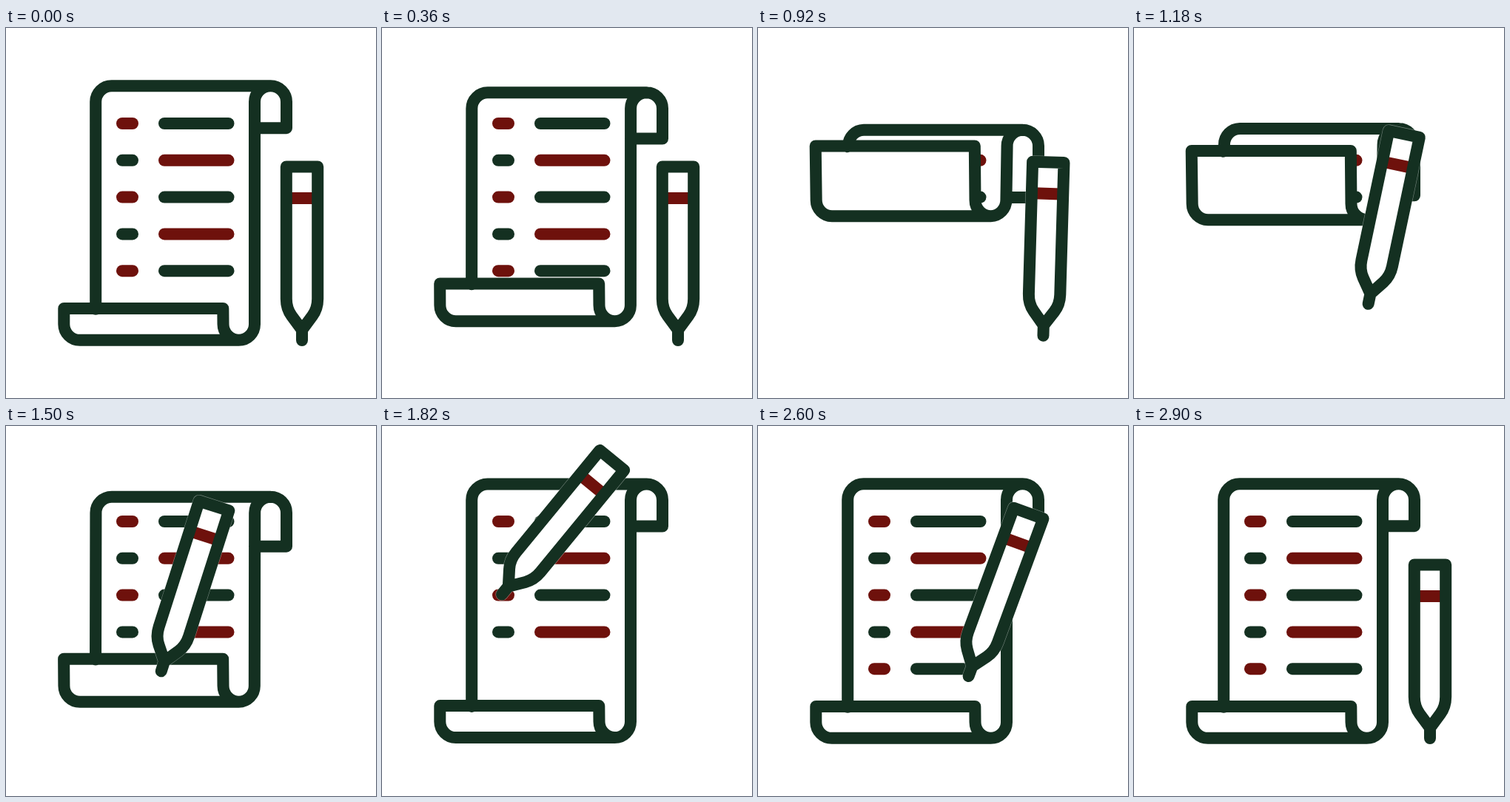
An HTML page that plays this animation: 500x500 px, repeating every 3 s.

```html
<!DOCTYPE html>
<html lang="en">
<head>
<meta charset="utf-8">
<title>Scroll and pencil</title>
<style>
  html, body { margin: 0; width: 100%; height: 100%; overflow: hidden; background: #fff; }
  svg { display: block; width: 100vw; height: 100vh; }
  .line { fill: none; stroke: #143021; stroke-width: 16; stroke-linecap: round; stroke-linejoin: round; }
  .red { stroke: #6e110c; }
  .paper { fill: #fff; }
  .halo { fill: #fff; stroke: #fff; stroke-opacity: .4; stroke-width: 17.2; stroke-linecap: round; stroke-linejoin: round; }
</style>
</head>
<body>
<svg viewBox="0 0 500 500">
  <defs>
    <clipPath id="page"><rect id="window" x="100" width="260"/></clipPath>
    <path id="body" d="M0 0V-14M0-14L-14-33Q-21.2-42.8-21.2-56V-234.5H21.2V-56Q21.2-42.8 14-33Z"/>
  </defs>
  <g id="rows" clip-path="url(#page)"></g>
  <path id="roll" class="paper"/>
  <path id="sheet" class="line"/>
  <g id="pencil">
    <use href="#body" class="halo"/>
    <path class="line red" d="M-18-192H18"/>
    <use href="#body" class="line"/>
  </g>
</svg>
<script>
const LOOP = 3000;
const $ = id => document.getElementById(id);
const mix = (a, b, p) => a + (b - a) * p;
const clamp = v => Math.min(1, Math.max(0, v));

// Symmetric ease: cubic-bezier(a, 0, 1 - a, 1)
function ease(x, a = 0.74) {
  let lo = 0, hi = 1;
  for (let i = 0; i < 24; i++) {
    const s = (lo + hi) / 2, r = 1 - s;
    if (3 * r * r * s * a + 3 * r * s * s * (1 - a) + s * s * s < x) lo = s; else hi = s;
  }
  return lo * lo * (3 - 2 * lo);
}

// Pencil keys: time, tip x, tip y, angle
const keys = [
  [660, 400, 422, 0],
  [1080, 366, 407, 4],
  [1180, 317, 373, 11.9],
  [1500, 210, 331.5, 17.7],
  [1620, 184, 304, 24],
  [1820, 162, 227.5, 39.4],
  [1980, 157, 323, 34],
  [2110, 170, 323, 32.5],
  [2160, 173, 306, 31],
  [2225, 213, 322, 29.5],
  [2260, 222, 323, 29],
  [2560, 271, 324, 22],
  [2700, 329, 399, 14],
  [2900, 400, 422, 0]
];

const slope = (i, c) => (keys[i + 1][c] - keys[i][c]) / (keys[i + 1][0] - keys[i][0]);

function tangent(i, c) {
  if (i === 0 || i === keys.length - 1) return 0;
  const a = slope(i - 1, c), b = slope(i, c);
  return a * b <= 0 ? 0 : 2 * a * b / (a + b);
}

// Smooth interpolation through the keys without overshoot
function pose(t, c) {
  const last = keys.length - 1;
  if (t <= keys[0][0]) return keys[0][c];
  if (t >= keys[last][0]) return keys[last][c];
  let i = 0;
  while (t > keys[i + 1][0]) i++;
  const h = keys[i + 1][0] - keys[i][0];
  const s = (t - keys[i][0]) / h, r = 1 - s;
  return r * r * (1 + 2 * s) * keys[i][c] + s * s * (3 - 2 * s) * keys[i + 1][c]
    + h * s * r * (r * tangent(i, c) - s * tangent(i + 1, c));
}

function addStroke(x1, x2, y, red) {
  const el = document.createElementNS("http://www.w3.org/2000/svg", "path");
  el.setAttribute("class", red ? "line red" : "line");
  el.setAttribute("d", `M${x1} ${y}H${x2}`);
  $("rows").append(el);
  return el;
}

let dash, rule;
const lastY = 328.2;
for (let i = 0; i < 5; i++) {
  const y = 129 + i * 49.8;
  dash = addStroke(157, 171, y, i % 2 === 0);
  rule = addStroke(214, 300.5, y, i % 2 === 1);
}

function write(el, x1, x2, t, from, to) {
  const whole = t < 700;
  const p = whole ? 1 : clamp((t - from) / (to - from));
  el.setAttribute("visibility", whole || t >= from ? "visible" : "hidden");
  el.setAttribute("d", `M${x1} ${lastY}H${mix(x1, x2, p) + 0.01}`);
}

function drawPaper(p) {
  const top = mix(78.3, 138, p), curl = mix(135.2, 229.4, p);
  const fold = mix(379, 158.5, p), base = mix(421.8, 253.5, p);
  const r = 21.5, arc = `A${r} ${r} 0 0 `;
  const hi = top + r, lo = base - r;
  const back = `M${121.2 - p * 0.5} ${fold + 0.8}L${121.2 + p * 0.8} ${hi}${arc}1 143 ${top}H357.5`
    + `${arc}1 379 ${hi}V${curl}H336`;
  const edge = `M357.5 ${top}${arc}0 ${336 + p * 0.6} ${hi}L${336 - p * 0.6} ${lo}${arc}1 314.5 ${base}${arc}1 293.5 ${lo}`;
  const front = `L${293.3 - p * 0.5} ${fold}H${78.3 - p * 0.6}L${78.3 + p * 0.4} ${lo}${arc}0 100 ${base}H314.5`;
  $("sheet").setAttribute("d", back + edge + front);
  $("roll").setAttribute("d", `M293.5 ${lo}${front}${arc}1 293.5 ${lo}Z`);
  $("window").setAttribute("y", top);
  $("window").setAttribute("height", base - top);
}

function draw(t) {
  drawPaper(t < 1000 ? ease(t / 1000) : 1 - ease(clamp((t - 1000) / 890)));
  write(dash, 157, 171, t, 1980, 2110);
  write(rule, 214, 300.5, t, 2215, 2740);
  $("pencil").setAttribute("transform",
    `translate(${pose(t, 1)} ${pose(t, 2)}) rotate(${pose(t, 3)})`);
}

const start = performance.now();
function tick() {
  draw((performance.now() - start) % LOOP);
  requestAnimationFrame(tick);
}
tick();
</script>
</body>
</html>
```
